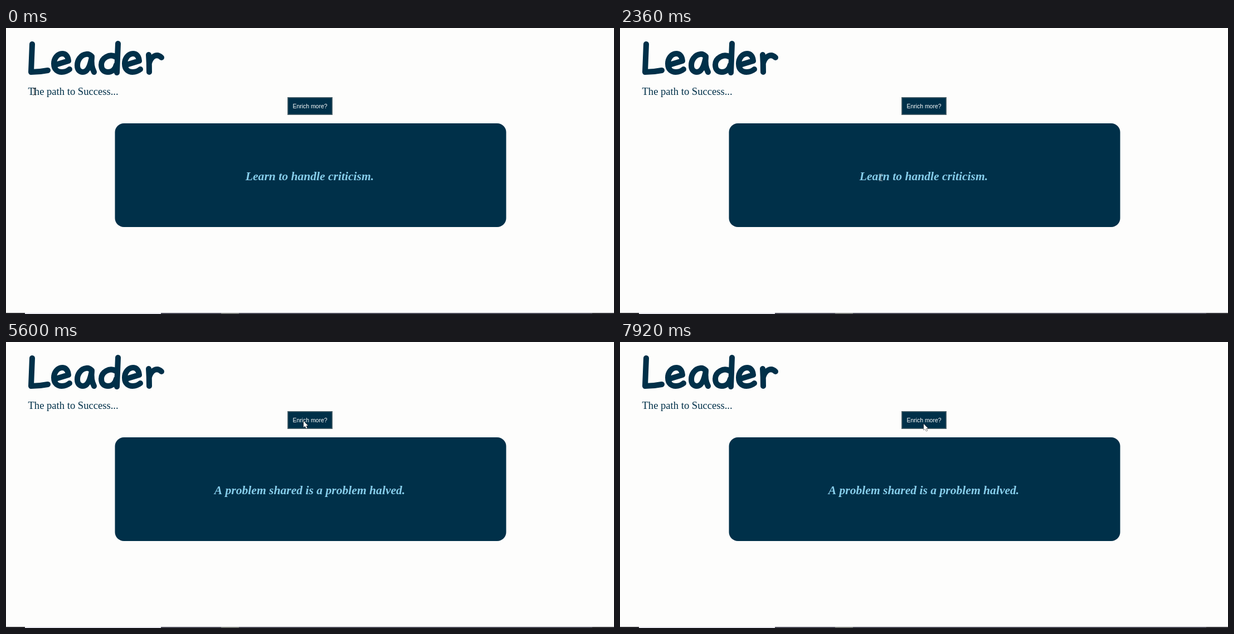
These frames come from a looping animation (1091x513 px, 8000 ms). An HTML page with a canvas:

```html
<!DOCTYPE html>
<html lang="en">
<head>
<meta charset="utf-8">
<title>Leader</title>
<style>
html, body { margin: 0; width: 100%; height: 100%; overflow: hidden; background: #fdfdfc; }
canvas { display: block; }
</style>
</head>
<body>
<canvas width="1091" height="513" role="img" aria-label="Leader: the path to Success"></canvas>
<script>
const ctx = document.querySelector('canvas').getContext('2d');
const LOOP = 8000;
const NAVY = '#003049', PAPER = '#fdfdfc', SKY = '#87ceeb';
const SERIF = '"Liberation Serif", "Times New Roman", serif';
const SANS = '"Liberation Sans", Arial, sans-serif';
const QUOTE_FONT = 'italic bold 21.6px ' + SERIF;
const QUOTE_Y = 273;
const CHANGE_AT = 4840, SELECT_FROM = 6080, SELECT_TO = 6920;

// Handwritten title, one pen path per letter
const letterE = 'M89 66L112 59C111 49 106 46 101 46C92 46 86 55 86 64C86 75 93 79 100 79Q108 79 114 74';
const title = new Path2D(
  'M47 29L45 79Q60 79 75 76' + letterE +
  'M154 51Q149 46 144 47C134 48 128 58 128 67C128 75 132 79 138 79C146 79 151 68 154 52Q152 68 158 79' +
  'M201 28L199 80M197 52C186 45 171 54 171 66C171 76 177 79 183 79C190 79 196 74 198 66' +
  'M256 48Q257 62 257 79M257 63C260 52 270 44 279 53');
title.addPath(new Path2D(letterE), { e: 127 });

const arrow = new Path2D('M0 0V11L2.6 8.7L4.6 13L6.4 12.2L4.5 8H7.8Z');
const beam = new Path2D('M-2.5 -6H-.8L0 -5L.8 -6H2.5M0 -5V5M-2.5 6H-.8L0 5L.8 6H2.5');

// Pointer stops: time, x, y
const stops = [
  [0, 51, 114], [80, 51, 114], [600, 260, 128], [1160, 475, 144],
  [1720, 474, 215], [2360, 468, 268], [2560, 478, 267], [3000, 508, 222],
  [3440, 526, 160], [4040, 532, 143], [4400, 534, 142], [5600, 534, 142],
  [6000, 424, 267], [6080, 424, 267], [6700, 663, 268], [6920, 663, 268],
  [7260, 646, 162], [7800, 545, 147], [8000, 545, 147]
];

function pointer(t) {
  const i = stops.findIndex(s => s[0] > t);
  const [t0, x0, y0] = stops[i - 1], [t1, x1, y1] = stops[i];
  const p = (t - t0) / (t1 - t0), k = p * p * (3 - 2 * p);
  return { x: x0 + (x1 - x0) * k, y: y0 + (y1 - y0) * k };
}

function rect(x, y, w, h, color) {
  ctx.fillStyle = color;
  ctx.fillRect(x, y, w, h);
}

function label(text, x, y, font, color) {
  ctx.font = font;
  ctx.fillStyle = color;
  ctx.fillText(text, x, y);
}

function drawPage() {
  rect(0, 0, 1091, 513, PAPER);
  ctx.strokeStyle = NAVY;
  ctx.lineWidth = 10;
  ctx.lineCap = ctx.lineJoin = 'round';
  ctx.stroke(title);
  label('The path to Success...', 39.5, 120, '18.6px ' + SERIF, NAVY);

  rect(505, 124, 81, 32, '#52666f');
  rect(506.5, 125.5, 78, 29, NAVY);
  label('Enrich more?', 514.5, 143.7, '10.43px ' + SANS, '#fff');

  ctx.fillStyle = NAVY;
  ctx.beginPath();
  ctx.roundRect(195.5, 171, 702, 186, 16);
  ctx.fill();

  rect(0, 511, 1091, 2, '#4b4b58');
  rect(0, 511, 34, 2, '#25252a');
  rect(34, 511, 244, 2, '#e6e6ee');
  rect(386, 511, 32, 2, '#777a78');
  rect(1052, 511, 39, 2, '#333338');
}

function drawQuote(t, mouse) {
  const text = t < CHANGE_AT ? 'Learn to handle criticism.' : 'A problem shared is a problem halved.';
  ctx.font = QUOTE_FONT;
  const width = ctx.measureText(text).width, left = 545 - width / 2;
  label(text, left, QUOTE_Y, QUOTE_FONT, SKY);

  if (t >= SELECT_FROM && t < SELECT_TO) {
    const edge = n => left + ctx.measureText(text.slice(0, n)).width;
    const start = text.indexOf('blem');
    let end = start;
    while (end < text.length && (edge(end) + edge(end + 1)) / 2 < mouse.x) end++;
    if (end > start) {
      const x = edge(start), w = edge(end) - x;
      ctx.save();
      ctx.beginPath();
      ctx.rect(x, 249, w, 30);
      ctx.clip();
      rect(x, 249, w, 30, '#0765d4');
      label(text, left, QUOTE_Y, QUOTE_FONT, '#fff');
      ctx.restore();
    }
  }
  return { left, right: left + width };
}

function drawPointer({ x, y }, quote) {
  const onQuote = x > quote.left && x < quote.right && y > 249 && y < 280;
  const onTagline = x > 39 && x < 203 && y > 103 && y < 125;
  ctx.save();
  ctx.translate(x, y);
  ctx.lineWidth = 1;
  if (onQuote || onTagline) {
    ctx.strokeStyle = onQuote ? '#a9b7bd' : '#222';
    ctx.stroke(beam);
  } else {
    ctx.fillStyle = '#fff';
    ctx.strokeStyle = '#222';
    ctx.stroke(arrow);
    ctx.fill(arrow);
  }
  ctx.restore();
}

function frame() {
  const t = performance.now() % LOOP, mouse = pointer(t);
  drawPage();
  drawPointer(mouse, drawQuote(t, mouse));
  requestAnimationFrame(frame);
}

ctx.fontKerning = 'none';
frame();
</script>
</body>
</html>
```
